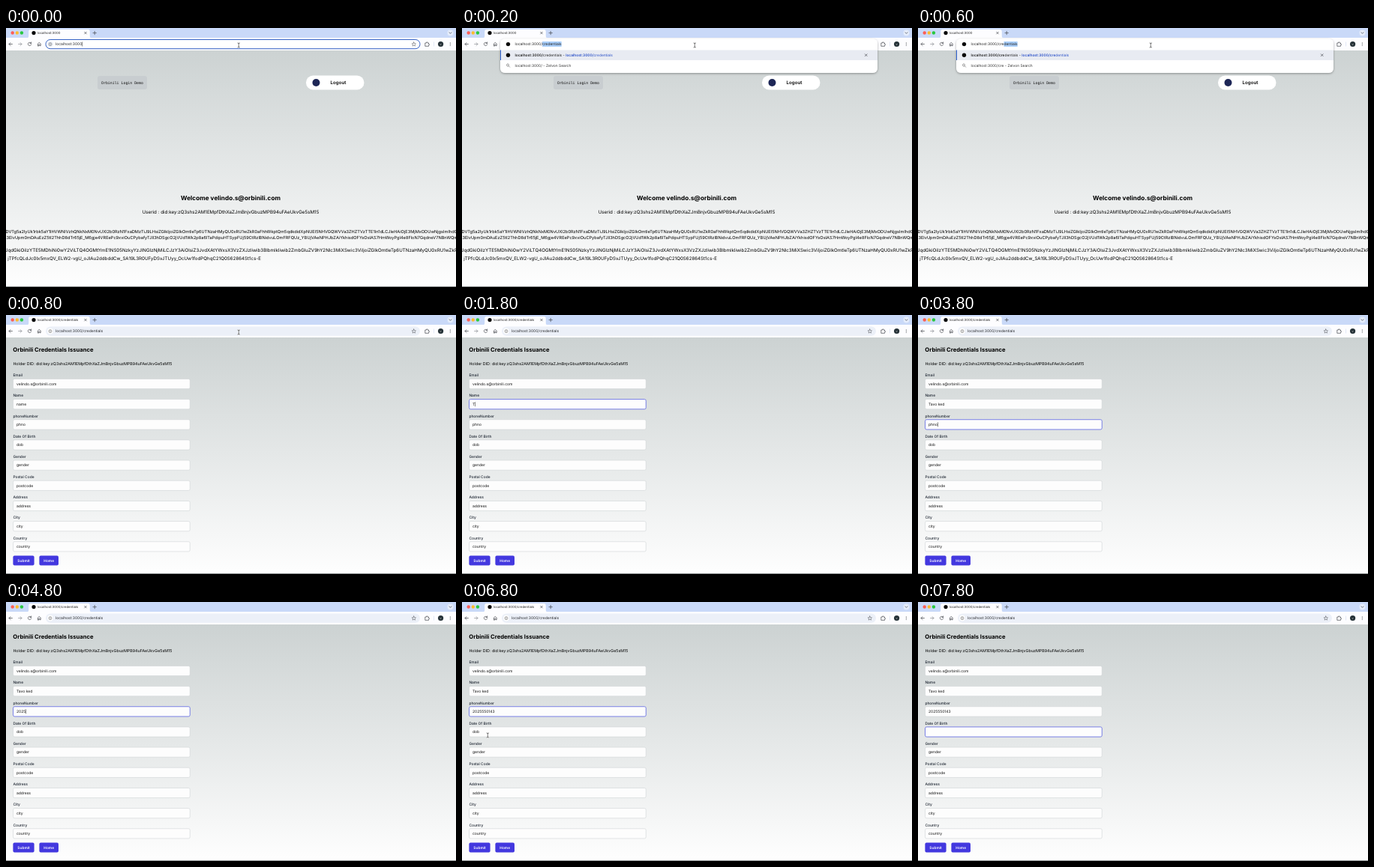
Recreate the animation shown at these times as an HTML page. Size 600x346 px, loop 8 s.

```html
<!DOCTYPE html>
<html lang="en">
<head>
<meta charset="utf-8">
<title>Credential form</title>
<style>
  html, body { margin: 0; width: 100%; height: 100%; overflow: hidden; background: #fff; }
  svg { display: block; width: 100vw; height: 100vh; }
  text { font-family: Inter, "Liberation Sans", sans-serif; text-rendering: geometricPrecision; white-space: pre; }
  .mono { font-family: "DejaVu Sans Mono", monospace; }
</style>
</head>
<body>
<svg id="stage" viewBox="0 0 600 346" preserveAspectRatio="none"></svg>
<script>
const STEP = 200, LOOP = 8000;
const stage = document.getElementById('stage');
const pen = document.createElement('canvas').getContext('2d');

const BRAND = 'Orbinili', EMAIL = 'velindo.s@orbinili.com';
const NAME = 'Tavo ked', PHONE = '2025550143';
const HOST = 'localhost:3000', PATH = '/credentials';
const DID = 'did:key:zQ3shs2AM1EMpfDthXaZJmBnjvGbuzMPB94uFAeUkvGe5sM15';
const TOKEN_LINES = [
  'DVTg5a2lyUk1rbk5aY1lHVWNlVzhQNkNxM0NvUXl2b0RzN1FxaDMzTiJ9LHsiZGlkIjoiZGlkOmtleTp6UTNzaHMyQU0xRU1wZkR0aFhhWkptQm5qdkdidXpNUEI5NHVGQWVVa3ZHZTVzTTE1In1dLCJleHAiOjE3MjMxODUwNjgsImlhdCI6M',
  'p3ElvUpm0mDAuEzZ5tl2ThhD8dTr65jE_M6gje4VREePc9xviOuCPybafyTJll3hDSgcO2jVUd1Wk2p8a6lTaPdipuHTSypFUj59CtRzlBNidvuLOmFRFQUz_YBUjVAeNPHJbZAiYkhisdOFYsOsIAS7HmWoyPgI4e8FloN7GqdneV7NBnWQmya',
  'JqdGkiOiIzYTE5MDhiNi0wY2ViLTQ4OGMtYmE1NS05NzkyYzJlNGIzNjMiLCJzY3AiOlsiZ3JvdXAtYWxsX3VzZXJzIiwib3BlbmlkIiwib2ZmbGluZV9hY2Nlc3MiXSwic3ViIjoiZGlkOmtleTp6UTNzaHMyQU0xRU1wZkR',
  'jTPfcQLdJc0Ix5mxQV_ELW2-vgU_oJIAu2ddbddCw_SA19L3R0UFyDSvJTUyy_OcUw1fodPQhqC21Q0S62864St1cs-E'
];

const rect = (x, y, w, h, fill, rx = 0, extra = '') =>
  `<rect x="${x}" y="${y}" width="${w}" height="${h}" rx="${rx}" fill="${fill}" ${extra}/>`;
const dot = (x, y, r, fill) => `<circle cx="${x}" cy="${y}" r="${r}" fill="${fill}"/>`;
const line = (d, color = '#44474c', w = .7) =>
  `<path d="${d}" fill="none" stroke="${color}" stroke-width="${w}" stroke-linecap="round" stroke-linejoin="round"/>`;
const text = (x, y, size, str, extra = '') =>
  `<text x="${x}" y="${y}" font-size="${size}" ${extra}>${str}</text>`;
const bold = str => `<tspan font-weight="600">${str}</tspan>`;
const cross = (x, y, r) => line(`M${x - r} ${y - r}l${2 * r} ${2 * r}m0 ${-2 * r}l${-2 * r} ${2 * r}`);
const caret = (x, y) => rect(x, y - 3, .5, 6, '#111');

function width(str, size) {
  pen.font = '100px Inter, "Liberation Sans", sans-serif';
  return pen.measureText(str).width * size / 100;
}

const ibeam = ([x, y]) => {
  const d = `M${x - 1.2} ${y - 3}q1.2 0 1.2 .8q0 -.8 1.2 -.8M${x} ${y - 2.2}v4.4M${x - 1.2} ${y + 3}q1.2 0 1.2 -.8q0 .8 1.2 .8`;
  return line(d, '#fff', 1.3) + line(d, '#222', .6);
};

function browser(title, url, focused) {
  return rect(0, 0, 600, 14, '#c9d9f8') + rect(0, 13, 600, 17, '#fdfdff') +
    ['#fe5f57', '#febc2e', '#28c840'].map((c, i) => dot(8.7 + i * 6.1, 6.5, 2.2, c)).join('') +
    '<path d="M28 13.2q2.2 0 2.2-2.2V4.6q0-2.6 2.6-2.6h76.400q2.600 0 2.600 2.600V11q0 2.200 2.200 2.200z" fill="#fdfdff"/>' +
    dot(37, 6.6, 2.6, '#0a0a0a') + text(42, 8.2, 4.3, title, 'fill="#222"') +
    cross(106, 6.6, 1.3) + line('M116 6.600h4.400m-2.200-2.200v4.400') +
    dot(592.5, 6.5, 4, '#e4ecfb') + line('M591 5.900l1.500 1.500l1.500-1.500') +
    line('M8.400 21.500h-4.400m2-2l-2 2l2 2') +
    line('M16.600 21.500h4.400m-2-2l2 2l-2 2', '#8a8d92') +
    line('M33.400 20.200a2.200 2.200 0 1 0 .3 1.700M33.600 18.900v1.600h-1.600') +
    line('M42.400 23.700v-2.700l1.900-1.600l1.900 1.600v2.700h-1.300v-1.500h-1.200v1.500z') +
    rect(53, 15.5, 499, 12.2, focused ? '#fff' : '#ecf0f8', 6.1,
      focused ? 'stroke="#3562c4" stroke-width="1"' : '') +
    dot(59, 21.6, 3.8, focused ? '#edf1f8' : '#fff') +
    '<circle cx="59" cy="21.600" r="2" fill="none" stroke="#555" stroke-width=".5"/>' +
    line('M59 21.500v1m0-2v.1', '#555', .5) +
    text(66, 23.3, 5, url, 'fill="#27292d"') +
    (focused ? caret(66 + width(url, 5) + .2, 21.5) : '') +
    line('M543.800 18.900l.8 1.800l1.900 .2l-1.400 1.300l.4 1.900l-1.700-1l-1.700 1l.4-1.900l-1.400-1.300l1.900-.2z', '#44474c', .5) +
    line('M559.200 20h1.300q0-1.300 .8-1.300t.8 1.300h1.400v1.400q1.100 0 1.100 .8t-1.100 .8v1.300h-4.300z') +
    rect(570.5, 18.5, .5, 6, '#c9d5ee') +
    dot(579.6, 21.5, 3.6, '#263238') + text(579.6, 22.8, 3.6, 'v', 'fill="#ddd" text-anchor="middle"') +
    [-1.8, 0, 1.8].map(d => dot(592.3, 21.5 + d, .55, '#44474c')).join('');
}

function suggestions(count) {
  const typed = HOST + PATH.slice(0, count), rest = PATH.slice(count);
  const x = 70.5, end = x + width(typed, 4.92);
  return rect(51, 14.5, 503, 45.5, '#fff', 6, 'filter="url(#shadow)"') +
    rect(51, 29.5, 503, 13.5, '#e8ebf2') + rect(51, 29.5, 1, 13.5, '#2f62d0') +
    dot(61.5, 21.6, 2.7, '#0a0a0a') + dot(61.5, 36.2, 2.7, '#0a0a0a') +
    rect(end, 18, width(rest, 4.92), 7, '#a9cffb') +
    text(x, 23.3, 4.92, typed + rest, 'fill="#222"') +
    text(x, 38, 4.85, `${bold(typed)}${rest} - <tspan fill="#2a50c8">${bold(typed)}${rest}</tspan>`, 'fill="#222"') +
    cross(538.7, 36.2, 1.4) +
    '<circle cx="61" cy="49.500" r="1.500" fill="none" stroke="#555" stroke-width=".6"/>' +
    line('M62.200 50.700l1.500 1.500', '#555', .6) +
    text(x, 51.8, 4.92, `${typed} - Zelvon Search`, 'fill="#333"');
}

function home() {
  const [a, b, c, d] = TOKEN_LINES;
  return rect(122, 64, 66, 18, '#c8cdd0', 3) +
    text(127, 74.7, 4.9, `${BRAND} Login Demo`, 'class="mono" fill="#111"') +
    rect(400, 63.5, 77.5, 19, '#fff', 9.5) + dot(413.5, 73, 5, '#1d2656') +
    text(432.5, 75.2, 6.2, 'Logout', 'font-weight="600"') +
    text(299.5, 230.2, 8.25, `Welcome ${EMAIL}`, 'font-weight="700" text-anchor="middle"') +
    text(299.5, 248.3, 6.24, `Userid : ${DID}`, 'text-anchor="middle"') +
    text(-.5, 273.7, 5.65, a) + text(-3, 281.7, 5.65, b) +
    text(-1, 299.3, 6.2, c) + text(340, 309.5, 6.2, d, 'text-anchor="end"');
}

const LABELS = ['Email', 'Name', 'phoneNumber', 'Date Of Birth', 'Gender', 'Postal Code', 'Address', 'City', 'Country'];

function form(s) {
  const nameLen = s < 13 ? s - 8 : s === 13 ? 6 : 8;
  const phoneLen = s < 22 ? 0 : [1, 2, 4, 5, 6, 8, 9][s - 22] ?? 10;
  const values = [
    EMAIL,
    s < 8 ? 'name' : NAME.slice(0, nameLen),
    s < 20 ? 'phno' : PHONE.slice(0, phoneLen),
    s < 36 ? 'dob' : '',
    'gender', 'postcode', 'address', 'city', 'country'
  ];
  const focus = s < 7 ? -1 : s < 18 ? 1 : s < 35 ? 2 : 3;
  const blinkOff = s === 16 || s === 17 || s === 30 || (s > 31 && s < 35) || s === 39;

  const fields = LABELS.map((label, i) => {
    const y = 92 + i * 27.17, on = i === focus;
    return text(9.4, y - 9.7, 4.9, label, 'font-weight="500" fill="#1c2430"') +
      rect(9.5, y - 6.6, 235.8, 13.2, '#fdfdfd', 2,
        `stroke="${on ? '#6c74e4' : '#cfd3d6'}" stroke-width="${on ? .9 : .6}"`) +
      text(14, y + 1.8, 5, values[i], 'fill="#111"') +
      (on && !blinkOff ? caret(14 + width(values[i], 5) + .2, y) : '');
  }).join('');

  const button = (x, w, label) => rect(x, 321.5, w, 13.1, '#4338df', 2) +
    text(x + w / 2, 329.8, 4.8, label, 'fill="#fff" font-weight="600" text-anchor="middle"');

  return text(9.3, 49.3, 7.65, `${BRAND} Credentials Issuance`, 'font-weight="700"') +
    text(9.4, 66.7, 5.36, `Holder DID: ${DID}`) + fields +
    button(9.4, 28.2, 'Submit') + button(44.4, 25.6, 'Home');
}

const MOUSE = {
  5: [170, 75], 6: [50, 119], 15: [50, 122], 16: [48, 135], 17: [45, 150],
  33: [36, 171], 34: [34.3, 178], 35: [34.3, 178]
};

const DEFS = `<defs>
  <linearGradient id="sky" x1="0" y1="0" x2="0" y2="1"><stop stop-color="#ccd2d2"/><stop offset="1" stop-color="#fefefe"/></linearGradient>
  <filter id="shadow" x="-5%" y="-20%" width="110%" height="150%"><feDropShadow dx="0" dy="1" stdDeviation="1.500" flood-opacity=".35"/></filter>
</defs>`;

function draw(s) {
  const onHome = s < 4;
  const title = onHome ? HOST : HOST + PATH;
  const mouse = s < 5 ? [310.3, 23] : MOUSE[s];
  stage.innerHTML = DEFS + rect(0, 29.5, 600, 316.5, 'url(#sky)') +
    (onHome ? home() : form(s)) +
    browser(title, title, s === 0) +
    (s > 0 && onHome ? suggestions([1, 2, 4][s - 1]) : '') +
    rect(0, 345.2, 600, .8, '#777c7e') +
    (mouse ? ibeam(mouse) : '');
}

let shown = -1;
function tick(now) {
  const s = Math.floor(now % LOOP / STEP);
  if (s !== shown) draw(shown = s);
  requestAnimationFrame(tick);
}
tick(performance.now());
</script>
</body>
</html>
```
